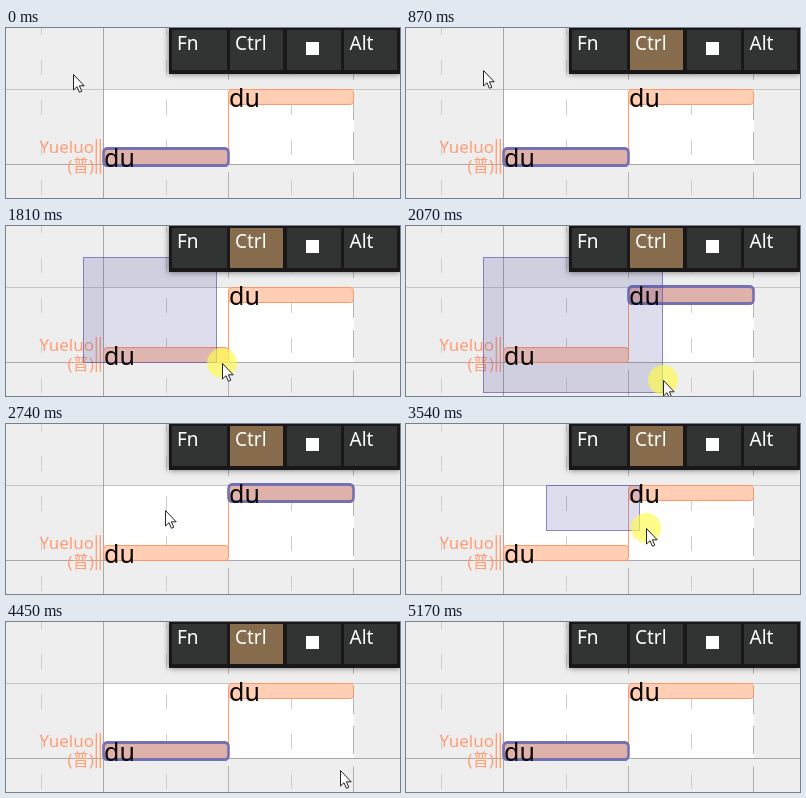
Recreate the animation shown at these times as an HTML page. Size 394x170 px, loop 6.83 s.

```html
<!DOCTYPE html>
<html lang="en">
<head>
<meta charset="utf-8">
<title>Ctrl marquee selection</title>
<style>
  html, body { margin: 0; width: 100%; height: 100%; overflow: hidden; background: #eee; }
  svg { display: block; width: 394px; height: 170px; font-family: "Noto Sans", "Noto Sans CJK SC", "Open Sans", sans-serif; }
  .grid { fill: none; stroke: #c6c6c6; }
  .axis { stroke: #a8a8a8; }
  .half { stroke: #cdcdcd; stroke-dasharray: 15 25; stroke-dashoffset: 8; }
  .beat { stroke: #b4b4b4; stroke-dasharray: 28 12; stroke-dashoffset: 16; }
  .label { fill: #ff9e75; text-anchor: end; font-weight: 500; }
  .orange { fill: none; stroke: #ff9e70; }
  .note { fill: #ffceb5; stroke: #ff9a68; transform-box: fill-box; transform-origin: center; }
  .note.on { fill: #deb2ab; stroke: #7470b2; stroke-width: 2.6; transform: scaleY(1.14); }
  .lyric { font-size: 25px; fill: #080808; }
  .keys { filter: drop-shadow(0 0 3px rgba(0, 0, 0, .55)); }
  .keys rect { fill: #323433; }
  .keys .held { fill: #866b4c; }
  .keys text { font-size: 19px; fill: #fff; }
  #box { fill: rgba(72, 68, 160, .18); stroke: rgba(84, 80, 168, .65); }
</style>
</head>
<body>
<svg viewBox="0 0 394 170">
  <rect width="394" height="170" fill="#eee"/>
  <rect x="97" y="61" width="251" height="75" fill="#fff"/>
  <path class="grid" d="M0 61.5H394"/>
  <path class="grid axis" d="M0 136.5H394M97.5 0V170"/>
  <path class="grid half" d="M35.5 0V170M160.5 0V170M285.5 0V170"/>
  <path class="grid beat" d="M222.5 0V170M347.5 0V170"/>

  <text class="label" x="88" y="125" font-size="17">Yueluo</text>
  <text class="label" x="88" y="144" font-size="16.5">(普)</text>
  <path class="orange" stroke-width="1.3" d="M90.3 111V146M94.3 111V146"/>
  <path class="orange" d="M222.5 70V130"/>

  <rect class="note" x="97.5" y="121.5" width="125" height="15" rx="3.5"/>
  <rect class="note" x="222.5" y="61.5" width="125" height="15" rx="3.5"/>
  <rect id="box"/>
  <text class="lyric" x="98" y="139">du</text>
  <text class="lyric" x="223" y="79">du</text>

  <g class="keys">
    <path d="M163 0H394V46H163Z" fill="#1a1718"/>
    <rect x="166" y="2" width="55" height="40"/>
    <rect id="ctrl" x="224" y="2" width="53" height="40"/>
    <rect x="281" y="2" width="54" height="40"/>
    <rect x="338" y="2" width="53" height="40"/>
    <text x="171" y="22">Fn</text>
    <text x="229" y="22">Ctrl</text>
    <path d="M300 14h13v13h-13Z" fill="#fff"/>
    <text x="343.5" y="22">Alt</text>
  </g>

  <g id="cursor">
    <circle id="press" cx="-1" r="15" fill="#fffc46" fill-opacity=".65"/>
    <path d="M-.5 .5V16L3 12.7 5.4 18.3 7.8 17.2 5.4 11.8H10.2Z" fill="#fff" stroke="#222"/>
  </g>
</svg>
<script>
const LOOP = 6830, STEP = 200 / 3, ROW = 15, LAG = 24;
const $ = id => document.getElementById(id);
const box = $('box'), ctrl = $('ctrl'), cursor = $('cursor'), press = $('press');
const notes = [...document.querySelectorAll('.note')];
const bounds = [{ x: 97, y: 121 }, { x: 222, y: 61 }];

// Cursor path: time, x, y
const path = [
  [0, 68, 46], [200, 68, 46], [266, 72, 43], [533, 72, 43], [600, 75, 41],
  [666, 78, 42], [1200, 78, 42], [1266, 80, 47], [1533, 145, 110],
  [1933, 253, 150], [2067, 258, 154], [2400, 260, 155], [2733, 160, 86],
  [3067, 141, 68], [3200, 141, 68], [3533, 241, 104], [3933, 332, 133],
  [4000, 338, 137], [4200, 343, 138], [4533, 330, 154], [4666, 330, 154],
  [4867, 343, 171]
];
const drags = [
  { from: 1260, to: 2395, x: 78, y: 42 },
  { from: 3195, to: 4195, x: 141, y: 68 }
];

function place(t) {
  const i = path.findIndex(p => p[0] > t);
  if (i < 0) return path[path.length - 1].slice(1);
  const [t0, x0, y0] = path[i - 1], [t1, x1, y1] = path[i];
  const k = (t - t0) / (t1 - t0);
  return [x0 + (x1 - x0) * k, y0 + (y1 - y0) * k];
}

// The marquee follows the cursor in x and snaps to whole pitch rows in y.
function marquee(drag, t) {
  const [x, y] = place(t - LAG);
  return {
    left: drag.x, right: Math.max(drag.x, Math.round(x)),
    top: Math.floor((drag.y - 1) / ROW) * ROW + 1,
    bottom: Math.ceil((y - 1) / ROW) * ROW + 1
  };
}

const hits = (m, n) =>
  m.left < n.x + 125 && m.right > n.x && m.top < n.y + ROW && m.bottom > n.y;

function draw(now) {
  const time = now % LOOP;
  const t = Math.floor((time + 7) / STEP) * STEP;
  const selected = [true, false];
  let active = null;

  for (const drag of drags) {
    if (t < drag.from) break;
    const m = marquee(drag, Math.min(t, drag.to));
    bounds.forEach((n, i) => { if (hits(m, n)) selected[i] = !selected[i]; });
    if (t < drag.to) active = m;
  }

  notes.forEach((n, i) => n.classList.toggle('on', selected[i]));
  ctrl.classList.toggle('held', time >= 870 && time < 5170);
  box.style.display = press.style.display = active ? '' : 'none';
  if (active) {
    box.setAttribute('x', active.left - .5);
    box.setAttribute('y', active.top + .5);
    box.setAttribute('width', active.right - active.left);
    box.setAttribute('height', active.bottom - active.top);
  }
  const [x, y] = place(t).map(Math.round);
  cursor.setAttribute('transform', `translate(${x} ${y})`);
  cursor.style.display = time < 4840 ? '' : 'none';
  requestAnimationFrame(draw);
}
requestAnimationFrame(draw);
</script>
</body>
</html>
```
